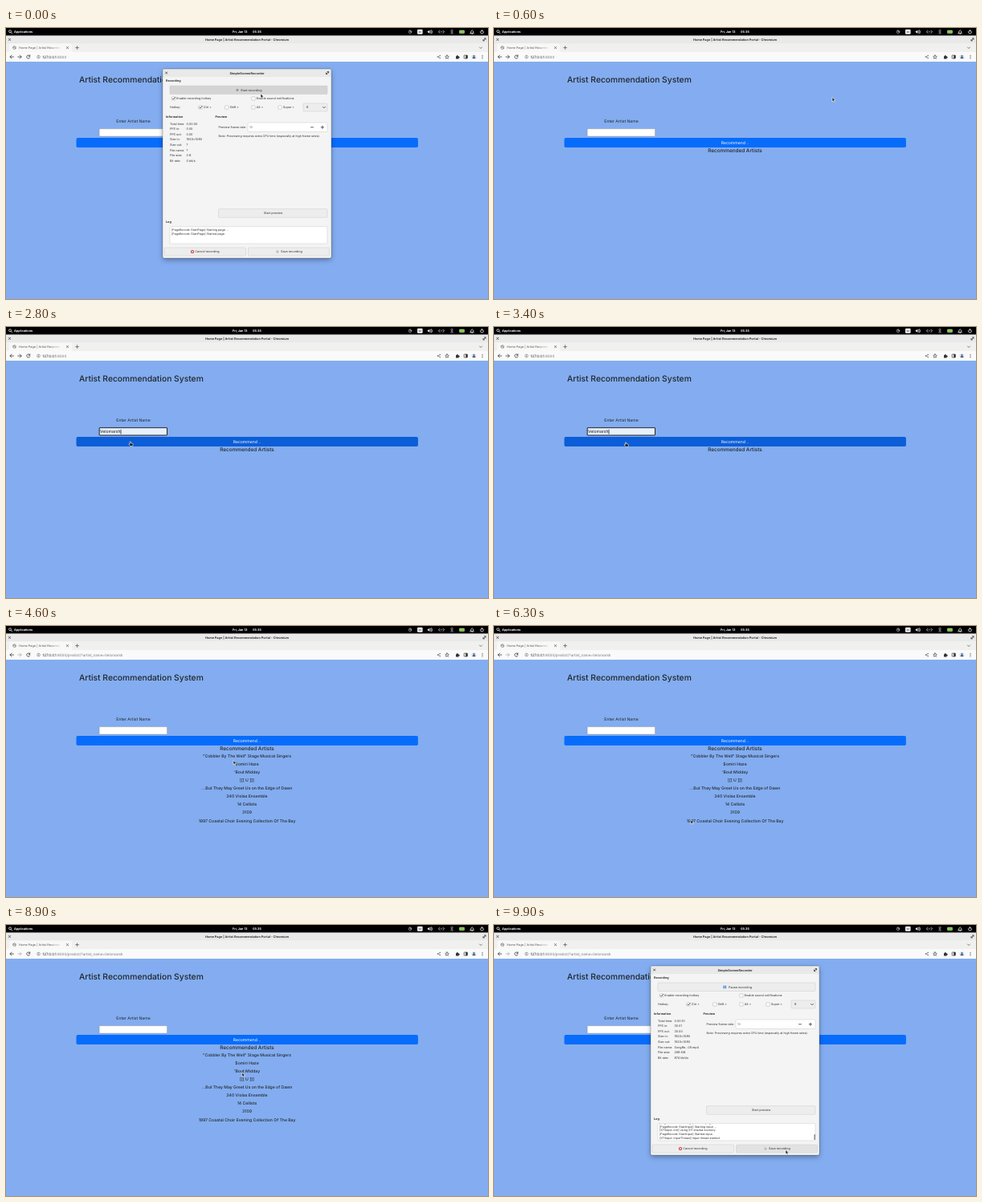
Animation of 600x338 px, one loop 10000 ms. Source, as an HTML page:

```html
<!DOCTYPE html>
<html lang="en">
<head>
<meta charset="utf-8">
<title>Screen recording</title>
<style>
  html, body { margin: 0; width: 100%; height: 100%; overflow: hidden; background: #83adf0; }
  svg { display: block; width: 100vw; height: 100vh; font-family: Inter, sans-serif;
    text-rendering: geometricPrecision; font-feature-settings: "calt" 0; }
  text { white-space: pre; }
  .line { fill: none; stroke: #333; stroke-width: .75; stroke-linecap: round; stroke-linejoin: round; }
</style>
</head>
<body>
<svg id="stage" viewBox="0 0 600 338"></svg>
<script>
const INK = '#212529', UI = '#333', BUTTON = '#ededed';
const ARTIST = 'Velomarsh';

// Text is placed by the middle of its line.
const text = (x, y, str, { size = 3.75, fill = UI, weight = 400, anchor = 'start', id = '' } = {}) =>
  `<text id="${id}" x="${x}" y="${y + size * .36}" font-size="${size}" fill="${fill}" font-weight="${weight}" text-anchor="${anchor}">${str}</text>`;
const rect = (x, y, w, h, fill, r = 0, more = '') =>
  `<rect x="${x}" y="${y}" width="${w}" height="${h}" fill="${fill}" rx="${r}" ${more}/>`;
const circle = (x, y, r, fill, more = '') => `<circle cx="${x}" cy="${y}" r="${r}" fill="${fill}" ${more}/>`;
const line = (d, stroke = UI, more = '') => `<path class="line" d="${d}" style="stroke:${stroke}" ${more}/>`;
const group = (id, content) => `<g id="${id}">${content}</g>`;
const bold = (x, y, str, more) => text(x, y, str, { weight: 700, ...more });
const frame = (x, y, w, h, fill = BUTTON, id = '') =>
  rect(x, y, w, h, fill, 1, `id="${id}" stroke="#c9c9c9" stroke-width=".5"`);
const cross = (x, y, r, color) => line(`M${x - r} ${y - r}l${2 * r} ${2 * r}m0 ${-2 * r}l${-2 * r} ${2 * r}`, color);
const expand = (x, y) => line(`M${x} ${y - 1.5}h1.5v1.5m0-1.5l-3 3m0-1.5v1.5h1.5`);

function panel() {
  const white = { fill: '#fff', weight: 700 };
  return rect(0, 0, 600, 9.375, '#000') +
    circle(5, 4.2, 1.5, 'none', 'stroke="#fff" stroke-width=".7"') + line('M6.2 5.4l1.4 1.4', '#fff') +
    text(10, 4.7, 'Applications', white) +
    text(282, 4.7, 'Fri, Jan 13', white) + text(307, 4.7, '05:35', white) +
    circle(503, 4.8, 1.8, 'none', 'stroke="#ccc" stroke-width=".6"') + line('M503 3v1.8h1.8', '#ccc') +
    rect(512, 1.8, 6.6, 6, '#eee', 1) + text(515.3, 4.8, 'en', { size: 3.2, fill: '#222', anchor: 'middle' }) +
    '<path d="M524.8 4h1l1.5-1.4v4.4l-1.5-1.4h-1z" fill="#fff"/>' + line('M528.6 3.4q1 1.4 0 2.8m1.2-3.6q1.6 2.2 0 4.4', '#fff') +
    line('M540 3.3l-1.5 1.5 1.5 1.5m4-3l1.5 1.5-1.5 1.5m-2.8-1.5h.1m1.4 0h.1', '#fff') +
    line('M553.5 3.3l3 3-1.5 1.5v-6l1.5 1.5-3 3', '#999') +
    rect(564.5, 3, 6, 3.6, '#7ac943', .6, 'stroke="#dfe8d8" stroke-width=".5"') +
    line('M578 6.4h4.4l-.8-1.2v-1.2q-1.4-2.4-2.8 0v1.2zm1.9 1.1h.6', '#fff') +
    line('M591.3 3.4a2 2 0 1 0 2.4 0m-1.2-1v2', '#fff');
}

function browser() {
  const grey = '#777';
  return rect(0, 9, 600, 10, '#e9e9e9') + cross(4.5, 14.4, 1.1) + expand(595.5, 14.4) +
    bold(300, 14.3, 'Home Page | Artist Recommendation Portal - Chromium', { anchor: 'middle', size: 3.85 }) +
    rect(0, 19, 600, 11, '#f0f0ee') +
    '<path d="M2 30q2 0 2-2v-6.500q0-2 2-2h74q2 0 2 2v6.500q0 2 2 2z" fill="#f8f8f7"/>' +
    circle(10.500, 24.600, 1.9, 'none', 'stroke="#666" stroke-width=".6"') + line('M8.900 24h2l.8 1.5', '#666') +
    text(16, 24.6, 'Home Page | Artist Recomm', { fill: 'url(#fade)', size: 3.85 }) +
    cross(76.5, 24.6, 1.1, '#555') + line('M86.700 24.600h3.8m-1.900-1.900v3.8', '#555') +
    line('M589.500 24l1.500 1.500 1.500-1.500', '#555') +
    rect(0, 30, 600, 12, '#fafafa') +
    line('M9.500 36h-4.500m2-2l-2 2 2 2') + line('M14.700 36h4.500m-2-2l2 2-2 2', UI, 'id="forward"') +
    line('M29.500 34.700a2.100 2.100 0 1 0 .3 2.100m0-3v1.500h-1.500') +
    circle(40.5, 36, 1.9, 'none', `stroke="${grey}" stroke-width=".6"`) + line('M40.500 35.900v1m0-2v0', grey) +
    `<text x="45.500" y="37.700" font-size="4.500" fill="#222">127.0.0.1<tspan id="path" fill="${grey}"></tspan></text>` +
    line('M540.300 34.500l-3 1.500 3 1.500', grey) + [[540.3, 34.5], [537.3, 36], [540.3, 37.5]].map(([x, y]) => circle(x, y, .7, grey)).join('') +
    line('M549 33.700l.7 1.500 1.600.2-1.200 1.100.3 1.700-1.400-.8-1.400.8.3-1.700-1.200-1.100 1.600-.2z', '#555') +
    rect(560, 35, 3.7, 3.5, UI, .4) + circle(561.8, 34.8, .9, UI) + circle(563.9, 36.6, .9, UI) +
    rect(570.2, 34, 4.2, 4, 'none', .4, `stroke="${UI}" stroke-width=".7"`) + rect(572.3, 34, 2.1, 4, UI) +
    circle(582.5, 36, 3, '#dbe4f3') + circle(582.5, 35.1, 1, '#46597a') + '<path d="M580.500 38a2 1.900 0 0 1 4 0z" fill="#46597a"/>' +
    [34.3, 36, 37.7].map(y => circle(593, y, .55, UI)).join('');
}

function page() {
  const middle = { size: 5.1, fill: INK, weight: 500, anchor: 'middle' };
  const artists = ['"Cobbler By The Well" Stage Musical Singers', '$omiri Haze', "'Bout Midday", '[[[ U ]]]',
    '...But They May Greet Us on the Edge of Dawn', '340 Violas Ensemble', '14 Cellists', '3109',
    '1997 Coastal Choir Evening Collection Of The Bay'];
  return rect(0, 42, 600, 296, '#83adf0') +
    text(91, 64, 'Artist Recommendation System', { size: 10.3, fill: INK, weight: 500 }) +
    text(158.5, 116.5, 'Enter Artist Name', { size: 5.1, fill: INK, anchor: 'middle' }) +
    rect(116.2, 125.7, 84.3, 9.3, '#fff', .3, 'id="field"') +
    text(117, 130.6, ARTIST, { size: 5.1, fill: '#111', id: 'entry' }) +
    line('M143 128.300v4.800', '#111', 'id="caret"') +
    rect(87.5, 137.1, 425.4, 11.875, '#076cfb', 1.8, 'id="button"') +
    text(300, 143, 'Recommend ..', { ...middle, fill: '#fff', weight: 400 }) +
    text(300, 152.8, 'Recommended Artists', { ...middle, size: 6.4 }) +
    group('results', artists.map((name, i) => text(300, 162.2 + i * 10.06, name, middle)).join('')) +
    group('menu', rect(147.5, 138, 31, 37.500, '#fff', .8, 'filter="url(#soft)"') +
      '<path d="M151 138.500l3-2.500 3 2.500z" fill="#fff"/>' + rect(147.5, 139.3, 31, 11.7, '#3583c6', 0, 'id="choice"') +
      [ARTIST, 'fen', ARTIST.toLowerCase()].map((s, i) => text(151.5, 145.2 + i * 11.7, s, { size: 4.1, fill: i ? '#333' : '#16395c' })).join(''));
}

function dialog() {
  const check = (x, y, label, on) => rect(x - 2.2, y - 2.2, 4.4, 4.4, '#fff', .7, 'stroke="#aaa" stroke-width=".5"') +
    (on ? line(`M${x - 1.2} ${y}l1 1.1 2.200-2.600`, '#222') : '') + text(x + 3.8, y, label);
  const info = ['Total time:', 'FPS in:', 'FPS out:', 'Size in:', 'Size out:', 'File name:', 'File size:', 'Bit rate:'];
  return rect(195, 51, 210, 236, '#f4f4f4', 2, 'filter="url(#shadow)"') +
    '<path d="M195 61v-8q0-2 2-2h206q2 0 2 2v8z" fill="#e9e9e9"/>' +
    rect(195, 51, 210, 236, 'none', 2, 'stroke="#000" stroke-opacity=".35" stroke-width=".6"') +
    cross(199.6, 56, 1.1) + expand(400, 56) + bold(300, 56.2, 'SimpleScreenRecorder', { anchor: 'middle', size: 3.85 }) +
    bold(199, 65.6, 'Recording') + frame(204, 72, 196, 10.5, BUTTON, 'record') +
    circle(288, 77.4, 1.6, '#999', 'id="dot"') +
    group('pause', rect(285.5, 75.6, 1.4, 3.6, '#3689e6') + rect(287.7, 75.6, 1.4, 3.6, '#3689e6')) +
    text(292, 77.4, '', { id: 'recordLabel' }) +
    check(208.5, 88, 'Enable recording hotkey', true) + check(308, 88, 'Enable sound notifications') +
    text(204, 99, 'Hotkey:') + check(242, 99, 'Ctrl +', true) + check(274.7, 99, 'Shift +') +
    check(308, 99, 'Alt +') + check(341, 99, 'Super +') +
    frame(370, 94, 30, 10) + text(374, 99, 'R') + line('M394.500 98.300l1.500 1.500 1.500-1.500') +
    bold(199, 111, 'Information') + bold(260.5, 111, 'Preview') +
    info.map((s, i) => text(204, 119.4 + i * 6.58, s) + text(224.5, 119.4 + i * 6.58, '', { id: 'info' + i })).join('') +
    text(264.5, 124, 'Preview frame rate:') + frame(301, 118, 99, 11.5, '#fff') + text(303, 124, '10', { fill: '#666' }) +
    line('M379.500 123.800h3m9.700 0h3.400m-1.700-1.700v3.400') +
    text(264.5, 134.6, 'Note: Previewing requires extra CPU time (especially at high frame rates).', { size: 3.65 }) +
    frame(264.5, 225.7, 135.5, 10.6) + text(332.5, 231.1, 'Start preview', { anchor: 'middle' }) +
    bold(199, 241.6, 'Log') + frame(204, 247.7, 196, 21.3, '#fff') +
    group('log', '') + rect(398.600, 261, 1, 7, '#555', .5, 'id="thumb"') +
    frame(197, 274, 101.5, 10) + circle(232, 279, 2, '#c6262e') + cross(232, 279, .7, '#fff') + text(235.3, 279, 'Cancel recording') +
    frame(301.5, 274, 101, 10, BUTTON, 'save') + rect(336.5, 277.6, 2.8, 2.8, '#bbb', .5) + text(342, 279, 'Save recording');
}

const cursors = group('arrow', '<path d="M0 0v5.300l1.200-1.100 1 2 .9-.4-.9-2h1.700z"/>') +
  group('hand', '<path d="M-.6 0q.6-.7 1.200 0v1.700l2.300.5q.6.200.5.900l-.4 2.300h-3l-1.900-2.400q.2-.9 1.300 0z"/>') +
  group('beam', '<path d="M-1-2.500h2m-1 0v5m-1 0h2" fill="none" stroke="#222"/>');

document.getElementById('stage').innerHTML = `<defs>
  <linearGradient id="fade"><stop offset=".75" stop-color="#555"/><stop offset="1" stop-color="#555" stop-opacity=".15"/></linearGradient>
  <filter id="soft"><feDropShadow dx="0" dy=".4" stdDeviation=".7" flood-opacity=".3"/></filter>
  <filter id="shadow"><feDropShadow dx="0" dy="2.5" stdDeviation="3" flood-opacity=".32"/></filter>
  <clipPath id="logClip"><path d="M204 248h196v20.700h-196z"/></clipPath></defs>` +
  page() + browser() + panel() + group('dialog', dialog()) +
  `<g id="pointer" fill="#1a1a1a" stroke="#fff" stroke-width=".6" stroke-linejoin="round">${cursors}</g>`;

const $ = id => document.getElementById(id);
const show = (id, on) => $(id).setAttribute('visibility', on ? 'inherit' : 'hidden');
const paint = (id, fill) => $(id).setAttribute('fill', fill);
$('log').setAttribute('clip-path', 'url(#logClip)');

// Pointer stops: time, x, y
const route = [[0, 317, 82], [100, 317, 82], [500, 421, 86.500], [800, 421, 86.500], [1400, 152, 131], [2000, 152, 131],
  [2300, 152, 139.5], [2700, 153, 143], [3100, 164, 144], [4200, 164, 144], [4600, 283, 167.500], [5300, 310, 200],
  [5900, 372, 255], [6400, 230, 240], [7100, 65, 95], [7500, 120, 82], [7700, 300, 110], [8000, 182, 107.5],
  [8200, 182, 107.5], [9100, 310, 195], [9600, 363, 280.5], [10000, 363, 280.5]];

function pointerAt(t) {
  const i = route.findIndex(stop => stop[0] > t);
  const [t0, x0, y0] = route[i - 1], [t1, x1, y1] = route[i];
  const u = (t - t0) / (t1 - t0), k = u * u * (3 - 2 * u);
  return [x0 + (x1 - x0) * k, y0 + (y1 - y0) * k];
}

function drawDialog(t) {
  const recording = t >= 100, late = t > 5000;
  const values = !recording ? ['0:00:00', '0.00', '0.00', '1920×1080', '?', '?', '0 B', '0 bit/s']
    : late ? ['0:00:' + (t >= 9500 ? '10' : '09'), '30.01', '30.00', '1920×1080', '1920×1080', 'SongRe...09.mp4', '298 KiB', '874 kbit/s']
    : ['0:00:00', '0.00', '0.00', '1920×1080', '1920×1080', 'SongRe...09.mp4', '0 B', '0 bit/s'];
  values.forEach((value, i) => $('info' + i).textContent = value);
  $('recordLabel').textContent = recording ? 'Pause recording' : 'Start recording';
  show('dot', !recording);
  show('pause', recording);
  show('thumb', recording);
  const lines = recording
    ? ['[PageRecord::StartPage] Started page.', '[PageRecord::StartInput] Starting input ...', '[X11Input::Init] Using X11 shared memory.',
      '[PageRecord::StartInput] Started input.', '[X11Input::InputThread] Input thread started.']
    : ['[PageRecord::StartPage] Starting page ...', '[PageRecord::StartPage] Started page.'];
  const top = recording ? 246.6 : 252;
  $('log').innerHTML = lines.map((s, i) => text(206, top + i * 4.65, s, { size: 3.65 })).join('');
}

function draw(now) {
  const t = Math.floor(now % 10000 / 100) * 100;  // ten pictures a second
  const [x, y] = pointerAt(t);
  const open = t < 500 || t >= 9000, loaded = t >= 4200;
  const inside = (left, top, right, bottom) => x > left && x < right && y > top && y < bottom;
  const menu = t >= 1700 && t < 2600, chosen = t >= 2100 && !loaded;
  const overButton = !open && !menu && inside(87, 137, 513, 149);
  const overField = !open && inside(116, 126, 200, 135);

  show('dialog', open);
  if (open) drawDialog(t);
  paint('record', open && inside(204, 72, 400, 83) ? '#d4d4d4' : BUTTON);
  paint('save', open && inside(301, 274, 403, 284) ? '#e2e2e2' : BUTTON);

  const focused = t >= 1500 && !loaded;
  paint('field', chosen ? '#e8f0fe' : '#fff');
  $('field').setAttribute('stroke', focused ? '#111' : '#777');
  $('field').setAttribute('stroke-width', focused ? .9 : .3);
  show('entry', chosen);
  $('entry').setAttribute('font-size', menu ? 4.2 : 5.1);
  show('caret', chosen && !menu);
  show('menu', menu);
  show('choice', menu && chosen);
  paint('button', overButton ? '#0b5ed7' : '#076cfb');
  show('results', loaded);
  $('path').textContent = ':8000' + (loaded ? '/predict/?artist_name=' + ARTIST : '');
  $('forward').style.stroke = loaded ? '#aaa' : UI;

  show('hand', overButton);
  show('beam', overField);
  show('arrow', !overButton && !overField);
  $('pointer').setAttribute('transform', `translate(${x} ${y})`);
}

const start = performance.now();
(function tick() {
  draw(performance.now() - start);
  requestAnimationFrame(tick);
})();
</script>
</body>
</html>
```
